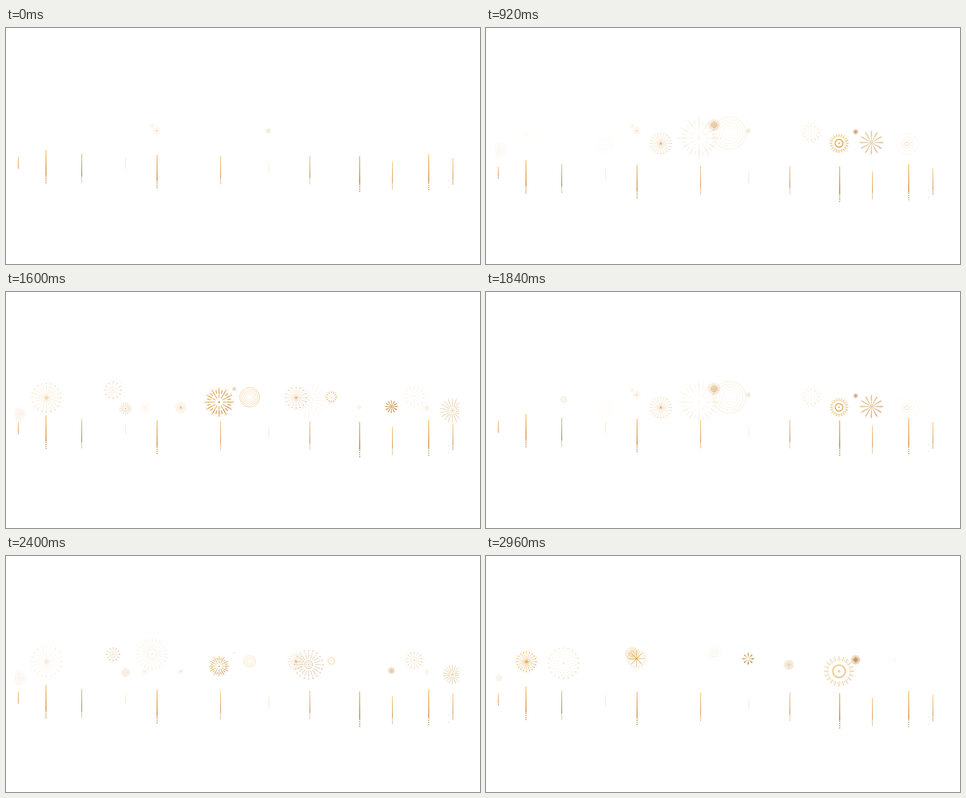
These frames come from a looping animation (960x480 px, 3000 ms). An HTML page with a canvas:

```html
<!DOCTYPE html>
<html lang="en">
<head>
<meta charset="utf-8">
<title>Fireworks</title>
<style>
html, body { margin: 0; width: 100%; height: 100%; overflow: hidden; background: #fff; }
canvas { display: block; }
</style>
</head>
<body>
<canvas id="stage" width="960" height="480"></canvas>
<script>
const LOOP = 3000, STEP = 40, TAU = Math.PI * 2;
const ctx = document.getElementById('stage').getContext('2d');
const ease = x => (1 - Math.cos(Math.PI * x)) / 2;

// Layers are drawn in a unit circle and scaled with the burst.
const rays = (n, from, to, width) => () => {
  ctx.lineWidth = width;
  ctx.beginPath();
  for (let i = 0; i < n; i++) {
    const a = i / n * TAU - Math.PI / 2, c = Math.cos(a), s = Math.sin(a);
    ctx.moveTo(c * from, s * from);
    ctx.lineTo(c * to, s * to);
  }
  ctx.stroke();
};
const dots = (n, dist, size, turn = 0) => () => {
  ctx.beginPath();
  for (let i = 0; i < n; i++) {
    const a = (i + turn) / n * TAU - Math.PI / 2;
    const x = Math.cos(a) * dist, y = Math.sin(a) * dist;
    ctx.moveTo(x + size, y);
    ctx.arc(x, y, size, 0, TAU);
  }
  ctx.fill();
};
const petals = (n, from, to, half) => () => {
  ctx.beginPath();
  for (let i = 0; i < n; i++) {
    const a = i / n * TAU - Math.PI / 2, mid = from + (to - from) * 0.82;
    const at = (d, w) => [Math.cos(a) * d - Math.sin(a) * w, Math.sin(a) * d + Math.cos(a) * w];
    ctx.moveTo(...at(from, 0));
    ctx.lineTo(...at(mid, half));
    ctx.lineTo(...at(to, 0));
    ctx.lineTo(...at(mid, -half));
  }
  ctx.fill();
};
const ring = (radius, width) => () => {
  ctx.lineWidth = width;
  ctx.beginPath();
  ctx.arc(0, 0, radius, 0, TAU);
  ctx.stroke();
};
const core = size => dots(1, 0, size);

const bursts = [];
function burst(x, y, radius, start, period, top, bottom, ...layers) {
  const paint = ctx.createLinearGradient(-0.7, -0.7, 0.7, 0.7);
  paint.addColorStop(0, top);
  paint.addColorStop(1, bottom);
  bursts.push({ x, y, radius, start, period, paint, layers });
}

burst(26, 248, 20, 338, 765, '#f1d8b5', '#e3c096', rays(18, .35, .95, .05), rays(18, .1, .28, .03));
burst(82, 215, 40, 242, 765, '#f3b850', '#d9964a', rays(20, .05, .78, .027), dots(20, .84, .05), dots(20, .98, .022, .5), core(.1));
burst(157, 218, 36, 188, 725, '#ebbc6c', '#bd8f5c', dots(20, .92, .08), dots(20, .75, .045, .5), dots(20, .6, .038), dots(18, .45, .032, .5), dots(14, .3, .028), core(.09));
burst(217, 200, 29, 88, 900, '#e9c68d', '#d8b27c', rays(12, .16, .9, .028), dots(12, .72, .055), dots(12, .96, .025, .5), core(.06));
burst(242, 237, 22, 165, 900, '#e9c48d', '#d4aa76', rays(16, .3, .92, .05), rays(8, .08, .25, .03), core(.07));
burst(281, 235, 19, 156, 900, '#f3d5a5', '#ebc89c', ring(.15, .05), ring(.38, .035), dots(20, .62, .035), dots(22, .92, .035));
burst(296, 199, 37, -217, 925, '#efb75f', '#d2a066', rays(24, .2, .68, .04), rays(24, .72, .95, .055), core(.09));
burst(305, 209, 38, -275, 918, '#f0a836', '#dda04f', rays(8, .04, .78, .05), dots(16, .92, .035, .5), rays(16, .73, .88, .035), core(.07));
burst(354, 235, 32, 306, 915, '#edb660', '#d59f64', rays(20, .03, .8, .024), dots(20, .87, .045), core(.09));
burst(431.5, 224, 48, 156, 910, '#ebba67', '#cea066', rays(12, .27, .5, .05), rays(24, .58, .82, .07), rays(12, .5, .98, .05), dots(24, .97, .018, .5), core(.075));
burst(462, 197, 20, 398, 900, '#e3bc82', '#d2a678', rays(20, .08, .96, .06), ring(.45, .08));
burst(493.5, 214, 39, 180, 930, '#f0b84c', '#dfaa58', dots(46, .94, .038), dots(42, .77, .031), dots(36, .6, .026), ring(.44, .02), ring(.28, .014));
burst(531, 209, 24, -264, 920, '#dcad5e', '#ba8d4e', petals(8, .25, 1, .12), rays(8, .2, .75, .05));
burst(587.5, 215, 36, 91, 925, '#edbd72', '#c99b68', rays(16, .04, .8, .022), dots(16, .85, .045), dots(16, .98, .025, .5), core(.09));
burst(613, 221, 37, -91, 910, '#dfa65f', '#b98351', rays(20, .4, .8, .05), dots(20, .92, .055), ring(.26, .06), ring(.14, .04), core(.06));
burst(659, 213.5, 23, 198, 910, '#f3be55', '#deab5a', petals(12, .5, .85, .09), dots(12, .94, .06, .5), dots(6, .3, .045), core(.06));
burst(715, 234.5, 42, 455, 930, '#efb955', '#d9a45a', ring(.38, .11), rays(20, .64, .94, .055), dots(20, .72, .035, .5), core(.08));
burst(748.5, 211, 16, 522, 945, '#d49d58', '#b37a43', rays(20, .02, .97, .085), ring(.4, .08));
burst(780.5, 233, 31, 217, 940, '#deac59', '#c08b4d', petals(12, .03, .99, .075), rays(12, .02, .85, .04), dots(24, 1, .016, .5));
burst(827, 212, 30, -93, 940, '#edc283', '#dab27d', rays(14, .18, .92, .025), dots(14, .68, .045), dots(14, .95, .025, .5), core(.07));
burst(852.5, 235.5, 30, 330, 880, '#f0c583', '#e4b982', ring(.17, .055), ring(.38, .025), ring(.62, .012), dots(30, .95, .025));
burst(904, 241, 37, 120, 900, '#ebc58d', '#dab584', rays(18, .27, .95, .045), rays(18, .1, .2, .02), core(.07));

const rockets = [];
const rocket = (x, top, length, tail, width, from = '#f3ae3c', to = '#c98a3f', spark = '#b7793e') =>
  rockets.push({ x, top, length, tail, width, from, to, spark });

rocket(25, 261.5, 20, 4, 1.4);
rocket(81, 248, 53, 14, 1.9);
rocket(153.4, 256, 46, 12, 1.2, '#b8905a', '#75583c', '#75583c');
rocket(242.3, 264, 20, 4, .9, '#f8dfb2', '#ecd0a8', '#ecd0a8');
rocket(306, 258, 53, 14, 1.9);
rocket(434.6, 260, 45, 12, 1.4);
rocket(532.2, 270, 22, 4, .9, '#f8dfb2', '#ecd0a8', '#ecd0a8');
rocket(615.5, 260, 45, 12, 1.2, '#d6a04f', '#a06f3f', '#a06f3f');
rocket(716.3, 261, 56, 15, 2.3);
rocket(782.6, 271, 44, 12, 1.4);
rocket(856.2, 257, 57, 15, 1.9);
rocket(905.2, 265, 44, 9, 1.4);

function drawRocket({ x, top, length, tail, width, from, to, spark }, shift) {
  const y = top + shift, end = y + length;
  const paint = ctx.createLinearGradient(0, y, 0, end);
  paint.addColorStop(0, from);
  paint.addColorStop(1, to);
  ctx.fillStyle = paint;
  ctx.beginPath();
  ctx.moveTo(x - width * .35, y);
  ctx.lineTo(x + width * .35, y);
  ctx.lineTo(x + width / 2, end);
  ctx.lineTo(x - width / 2, end);
  ctx.fill();
  ctx.fillStyle = spark;
  const size = width * 1.05, count = tail > 8 ? 4 : 2;
  for (let i = 0; i < count; i++)
    ctx.fillRect(x - size / 2, end + 1 + (tail - 2) * i / (count - 1), size, Math.min(1.7, size));
}

function drawBurst({ x, y, radius, start, period, paint, layers }, t) {
  if (t < start) return;
  const size = ease((t - start) / period % 1);
  const alpha = Math.min(1, 4 * size, 2.95 * (1 - size) - .08);
  if (size < .015 || alpha <= 0) return;
  ctx.save();
  ctx.globalAlpha = alpha;
  ctx.translate(x, y);
  ctx.scale(radius * size, radius * size);
  ctx.fillStyle = ctx.strokeStyle = paint;
  layers.forEach(layer => layer());
  ctx.restore();
}

function draw(t) {
  ctx.fillStyle = '#fff';
  ctx.fillRect(0, 0, 960, 480);
  ctx.save();
  ctx.beginPath();
  ctx.rect(18, 0, 900, 480);
  ctx.clip();
  const shift = 20.6 * ease((t - 10) / 910);
  bursts.forEach(b => drawBurst(b, t));
  rockets.forEach(r => drawRocket(r, shift));
  // loose sparks beside the last rocket
  [[894.8, 302, .3], [896.5, 309, .8], [896.5, 323, .8], [894.8, 330, .3]].forEach(([x, y, alpha]) => {
    ctx.globalAlpha = alpha;
    ctx.fillStyle = '#c9a27a';
    ctx.fillRect(x - .6, y + shift, 1.2, 1.2);
  });
  ctx.restore();
}

const began = performance.now();
function tick() {
  const t = (performance.now() - began) % LOOP;
  draw(Math.floor(t / STEP) * STEP);
  requestAnimationFrame(tick);
}
tick();
</script>
</body>
</html>
```
